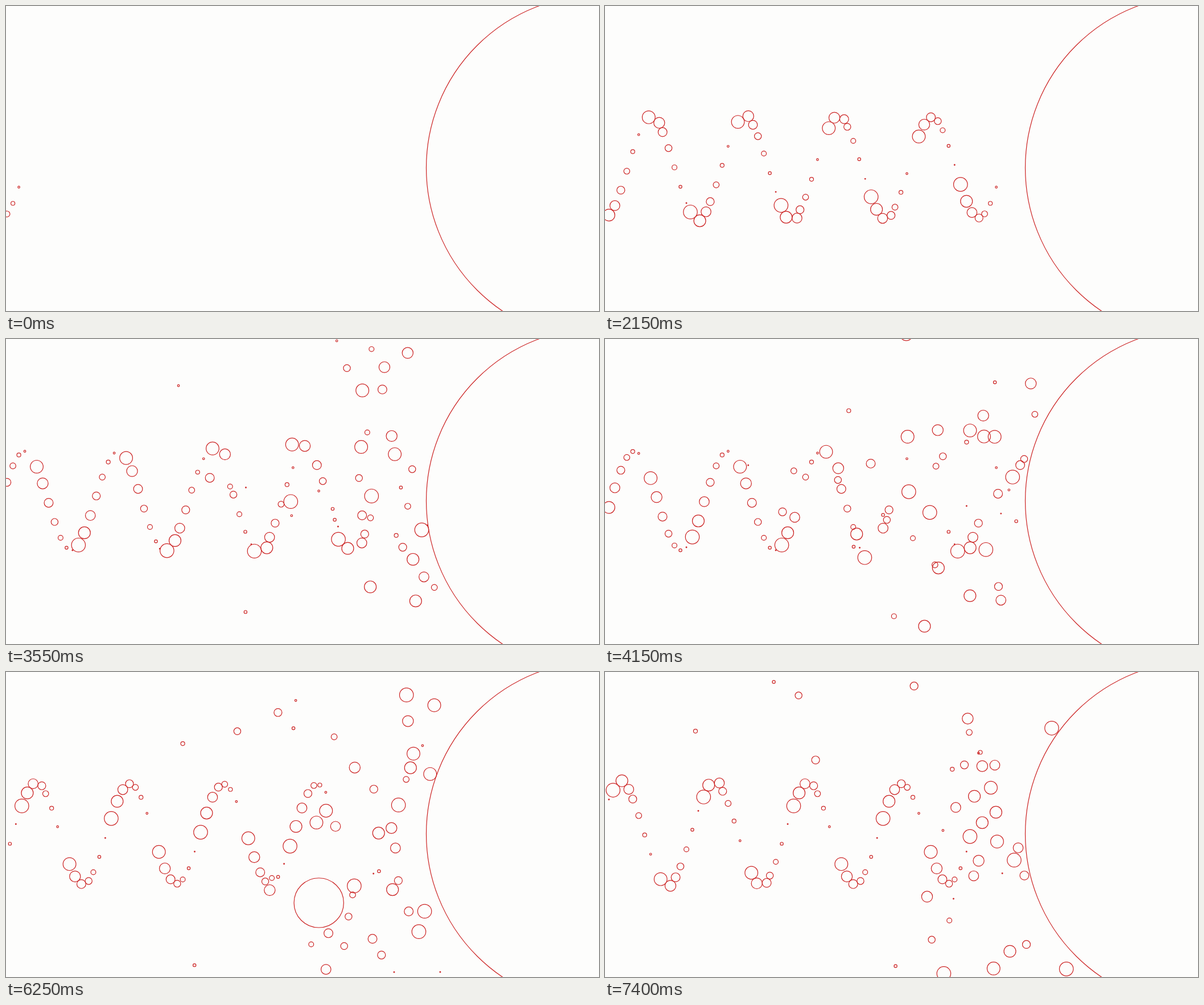
Animation of 1042x537 px, one loop 7450 ms. Source, as an HTML page with a canvas:

```html
<!DOCTYPE html>
<html lang="en">
<head>
<meta charset="utf-8">
<title>Bubble stream</title>
<style>
  html, body { margin: 0; width: 100%; height: 100%; overflow: hidden; background: #fdfdfc; }
  canvas { display: block; }
</style>
</head>
<body>
<canvas id="stage" width="1042" height="537"></canvas>
<script>
const LOOP = 7450, TICK = 50;
const UNIT = 0.8727;            // pixels per world unit
const SPEED = 6 * UNIT;         // pixels per step
const WALL = { x: 1042.7, y: 284.9, r: 304.2 };
const GIANT = 132;              // the one oversized bubble in the stream

// [time in ms, simulation step]
const CLOCK = [[0, 5], [2150, 132], [2950, 181], [4150, 252], [5200, 317], [6250, 378], [7400, 436]];
const LAST = CLOCK[CLOCK.length - 1][1];

function giantAt(step) {
  const k = step - 317, bend = k > 0 ? k * k : 0;
  return { x: 282 + 5.2 * k - 0.0133 * bend, y: 297 + 0.5 * k + 0.0212 * bend };
}

function spawn(n, step) {
  if (n === GIANT) {
    return { ...giantAt(step), vx: 0, vy: 0, r: 50 * UNIT, w: 0, giant: true };
  }
  const r = (2 * n % 15) * UNIT;
  return { x: -3.6, y: WALL.y + 100 * UNIT * Math.sin(0.4 * n), vx: SPEED, vy: 0, r, w: 1 / (r * r) };
}

function approach(c) {
  return (c.b.vx - c.a.vx) * c.nx + (c.b.vy - c.a.vy) * c.ny;
}

function findContacts(balls) {
  const list = [];
  for (let i = 0; i < balls.length; i++) {
    const a = balls[i];
    for (let j = i + 1; j < balls.length; j++) {
      const b = balls[j], dx = b.x - a.x, dy = b.y - a.y, sum = a.r + b.r;
      const d2 = dx * dx + dy * dy;
      if (d2 >= sum * sum) continue;
      const d = Math.sqrt(d2) || 1;
      const c = { a, b, sum, nx: dx / d, ny: dy / d, w: a.w + b.w, push: 0 };
      const v = approach(c);
      c.bounce = v < -0.15 ? -v : 0;
      list.push(c);
    }
  }
  return list;
}

function solveSpeed(c) {
  const old = c.push;
  c.push = Math.max(0, old + (c.bounce - approach(c)) / c.w);
  const p = c.push - old;
  c.a.vx -= p * c.a.w * c.nx;
  c.a.vy -= p * c.a.w * c.ny;
  c.b.vx += p * c.b.w * c.nx;
  c.b.vy += p * c.b.w * c.ny;
}

function solveOverlap(c) {
  const dx = c.b.x - c.a.x, dy = c.b.y - c.a.y, d = Math.hypot(dx, dy) || 1;
  const fix = Math.min(1.7, 0.2 * (c.sum - d - 0.04));
  if (fix <= 0) return;
  const k = fix / (c.w * d);
  c.a.x -= dx * k * c.a.w;
  c.a.y -= dy * k * c.a.w;
  c.b.x += dx * k * c.b.w;
  c.b.y += dy * k * c.b.w;
}

function hitWall(b) {
  const dx = b.x - WALL.x, dy = b.y - WALL.y, d = Math.hypot(dx, dy), gap = WALL.r + b.r;
  if (d >= gap) return;
  const nx = dx / d, ny = dy / d, v = b.vx * nx + b.vy * ny;
  b.x = WALL.x + nx * gap;
  b.y = WALL.y + ny * gap;
  if (v < 0) {
    b.vx -= 2 * v * nx;
    b.vy -= 2 * v * ny;
  }
}

function advance(balls, step) {
  for (const b of balls) {
    if (!b.giant) continue;
    const next = giantAt(step + 1);
    b.vx = next.x - b.x;
    b.vy = next.y - b.y;
  }
  const contacts = findContacts(balls);
  for (let i = 0; i < 8; i++) contacts.forEach(solveSpeed);
  for (const b of balls) {
    b.x += b.vx;
    b.y += b.vy;
  }
  for (let i = 0; i < 10; i++) contacts.forEach(solveOverlap);
  for (const b of balls) if (!b.giant) hitWall(b);
}

const inRange = b => b.x > -60 && b.x < 1200 && b.y > -150 && b.y < 690;

function simulate() {
  const states = [[]];
  let balls = [];
  for (let step = 0; step < LAST; step++) {
    const n = step / 2 + 1;
    if (step % 2 === 0 && n % 15 !== 0) balls.push(spawn(n, step));
    advance(balls, step);
    balls = balls.filter(inRange);
    states.push(balls.map(({ x, y, r }) => ({ x, y, r })));
  }
  return states;
}

function stepAt(ms) {
  const t = Math.floor(ms / TICK) * TICK;
  let i = 1;
  while (i < CLOCK.length - 1 && t > CLOCK[i][0]) i++;
  const [t0, s0] = CLOCK[i - 1], [t1, s1] = CLOCK[i];
  return Math.min(LAST, Math.round(s0 + (s1 - s0) * (t - t0) / (t1 - t0)));
}

const ctx = document.getElementById('stage').getContext('2d');
const states = simulate();
const start = performance.now();

function ring({ x, y, r }) {
  ctx.beginPath();
  ctx.arc(x, y, r, 0, 2 * Math.PI);
  ctx.stroke();
}

function draw() {
  const ms = Math.max(0, performance.now() - start) % LOOP;
  ctx.fillStyle = '#fdfdfc';
  ctx.fillRect(0, 0, 1042, 537);
  ctx.strokeStyle = '#cc2424';
  ctx.lineWidth = 1.2;
  ring(WALL);
  states[stepAt(ms)].forEach(ring);
  requestAnimationFrame(draw);
}
draw();
</script>
</body>
</html>
```
